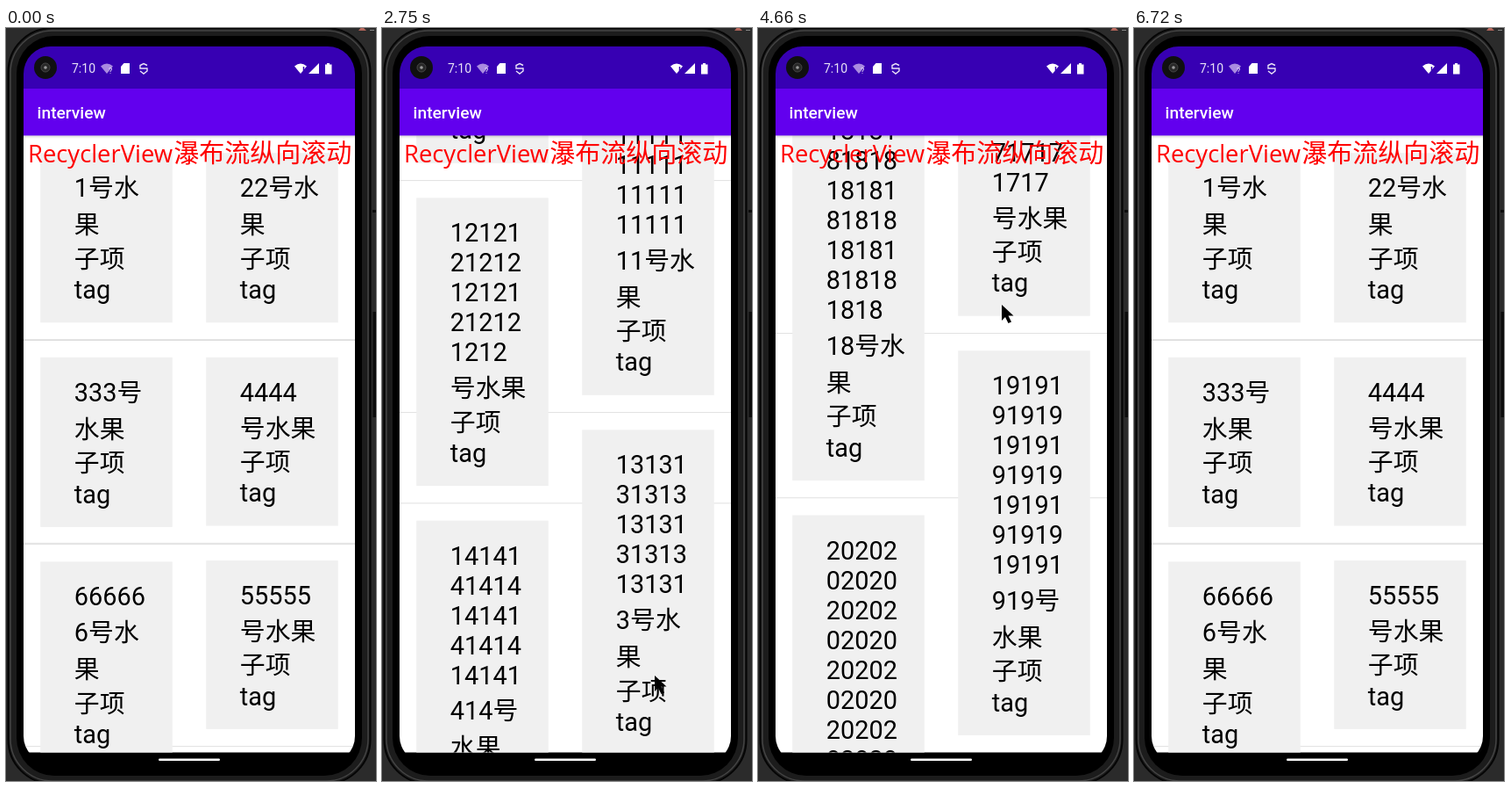
These frames come from a looping animation (422x857 px, 7.24 s). An HTML page:

```html
<!DOCTYPE html>
<html lang="zh-CN">
<head>
<meta charset="utf-8">
<style>
html, body { margin: 0; width: 100%; height: 100%; overflow: hidden; background: #2b2b2b; }
svg { display: block; width: 422px; height: 857px; }
text { font-family: Roboto, "Noto Sans CJK SC", "Noto Sans CJK", sans-serif; }
#list text { font-size: 28.9px; }
</style>
</head>
<body>
<svg viewBox="0 0 422 857">
  <defs>
    <clipPath id="screen"><rect x="20" y="21" width="378" height="816" rx="31"/></clipPath>
    <clipPath id="content"><rect x="20" y="122" width="378" height="702.5"/></clipPath>
    <linearGradient id="shade" x2="0" y2="1">
      <stop stop-opacity=".16"/><stop offset="1" stop-opacity="0"/>
    </linearGradient>
    <path id="wifi" d="M0 3.5Q7-2.5 14 3.5L7 12z"/>
  </defs>

  <!-- phone body -->
  <rect width="422" height="857" fill="#2b2b2b"/>
  <path d="M402 3l4-5 5 5z" fill="#b5675c"/>
  <path d="M415 2.500h5" stroke="#888"/>
  <path d="M420 207v3M420.500 323v120" stroke="#0c0c0c" stroke-width="4"/>
  <rect x="2.500" y="0" width="413" height="860" rx="50" fill="#1c1c1c" stroke="#050505" stroke-width="2"/>
  <rect x="5" y="3" width="408" height="854" rx="48" fill="none" stroke="#444" stroke-width="1.500"/>
  <rect x="12" y="9" width="394" height="842" rx="43"/>

  <g clip-path="url(#screen)">
    <rect x="20" y="122" width="378" height="702.5" fill="#fff"/>
    <g clip-path="url(#content)">
      <g id="list"><g id="dividers" fill-opacity=".12"></g><g id="cards"></g></g>
      <rect x="20" y="122" width="378" height="4" fill="url(#shade)"/>
      <text x="191.300" y="152.600" font-size="29" fill="#f00">瀑布流纵向滚动</text>
      <text x="25" y="152.600" font-size="27.400" fill="#f00" style="font-family:'Open Sans',sans-serif">RecyclerView</text>
    </g>
    <rect x="20" y="21" width="378" height="48" fill="#3700b3"/>
    <rect x="20" y="69" width="378" height="53.400" fill="#6200ee"/>
    <text x="35.500" y="103" font-size="19.250" font-weight="500" fill="#fff">interview</text>
    <text x="75" y="51" font-size="14" fill="#e9e2f6">7:10</text>
    <use href="#wifi" x="108" y="40" fill="#a98be0"/>
    <text x="117" y="52" font-size="9" fill="#e9e2f6">?</text>
    <path d="M134.500 40h6.500v12h-10v-8z" fill="#fff"/>
    <path d="M161 42.500l-4-2-4 2v3.500h8v3l-4 3-4-3" fill="none" stroke="#e9e2f6" stroke-width="1.400"/>
    <g fill="#fff">
      <use href="#wifi" x="329" y="40"/>
      <path d="M345 52l12-12v12zM364 41.500h2v-1.500h3v1.500h2.500v11h-7.500z"/>
    </g>
    <path d="M339.500 44v5M339.500 50.500v1.500" stroke="#3700b3" stroke-width="1.500"/>
    <circle cx="45" cy="45" r="13" fill="#101010"/>
    <circle cx="45" cy="45" r="5" fill="#282828" stroke="#444"/>
    <circle cx="45" cy="45" r="1.800" fill="#999"/>
  </g>
  <rect x="174" y="831.500" width="70" height="2.500" rx="1.200" fill="#fff"/>

  <g id="cursor">
    <circle id="press" r="12.500" fill="#f8ee3c" fill-opacity=".75"/>
    <path d="M0 0V18l4-4 3.500 7 3.500-1.500-3.500-7h6z"/>
  </g>
</svg>
<script>
const $ = id => document.getElementById(id);

function add(parent, tag, attrs, text = '') {
  const el = document.createElementNS('http://www.w3.org/2000/svg', tag);
  for (const name in attrs) el.setAttribute(name, attrs[name]);
  el.textContent = text;
  parent.append(el);
}

// Wrap the repeated number and its suffix at five digits' width.
function wrap(n) {
  const digits = String(n).repeat(n), tail = '号水果';
  const rows = digits.match(/.{1,5}/g), last = rows.length - 1;
  const fit = [0, 2, 2, 1, 0][digits.length % 5];
  // Long numbers do not leave a single digit behind.
  if (n > 15 && rows[last].length === 1) {
    rows[last] = rows[last - 1].slice(-1) + rows[last];
    rows[last - 1] = rows[last - 1].slice(0, -1);
  }
  rows[last] += tail.slice(0, fit);
  return [...rows, tail.slice(fit)];
}

// Staggered grid: each card goes to the shorter column.
const isWide = row => /\D/.test(row);
const bottoms = [142.2, 142.2];
for (let n = 1; n <= 20; n++) {
  const col = bottoms[0] <= bottoms[1] ? 0 : 1;
  const top = bottoms[col], x = 39.25 + col * 189;
  const labels = [];
  let y = 50;
  wrap(n).forEach((row, i, rows) => {
    if (i) y += !isWide(row) ? 34 : isWide(rows[i - 1]) ? 42 : 40.7;
    labels.push([row, y]);
  });
  labels.push(['子项', y += 38.5], ['tag', y += 35.2]);
  const height = y + 27.4;
  add($('dividers'), 'rect', { x: 20, y: top + height + 19.25, width: 378, height: 1 });
  add($('cards'), 'rect', { x, y: top, width: 150.5, height, fill: '#f0f0f0' });
  for (const [label, dy] of labels) add($('cards'), 'text', { x: x + 38.5, y: top + dy }, label);
  bottoms[col] = top + height + 39.5;
}

// Keys: [step, values, decelerate]
const scrollKeys = [
  [1.5, [0]], [3.5, [300]], [10, [1563], true], [11, [1602]], [12.5, [1900]],
  [18, [2630], true], [21, [2630]], [22, [2604]], [24, [2250]], [29, [0], true]
];
const cursorKeys = [
  [1.5, [328, 661]], [3.5, [328, 361]], [4.5, [328, 361]], [7, [311, 737]], [10, [320, 742]],
  [11, [320, 703]], [12.5, [310, 405]], [18, [278, 315]], [21, [310, 461]], [22, [310, 487.5]],
  [24, [306, 840]]
];
const presses = [[1.5, 3.5], [10, 12.5], [21, 24]];

function sample(keys, step) {
  const i = keys.findIndex(key => key[0] > step);
  if (i < 1) return keys.at(i)[1];
  const [start, from] = keys[i - 1], [end, to, decelerate] = keys[i];
  let p = (step - start) / (end - start);
  if (decelerate) p = 1 - (1 - p) ** 2;
  return from.map((v, j) => v + (to[j] - v) * p);
}

function draw(now) {
  const t = now % 7240;
  const step = Math.max(0, Math.floor((t - 1538) / 172.7));
  const active = t >= 1530 && step < 30;
  const [scroll] = sample(scrollKeys, step);
  $('list').setAttribute('transform', `translate(0 ${-scroll})`);
  $('cursor').setAttribute('transform', `translate(${sample(cursorKeys, step)})`);
  $('cursor').setAttribute('visibility', active ? 'visible' : 'hidden');
  $('press').setAttribute('opacity', presses.some(([a, b]) => step >= a && step <= b) ? 1 : 0);
  requestAnimationFrame(draw);
}
requestAnimationFrame(draw);
</script>
</body>
</html>
```
